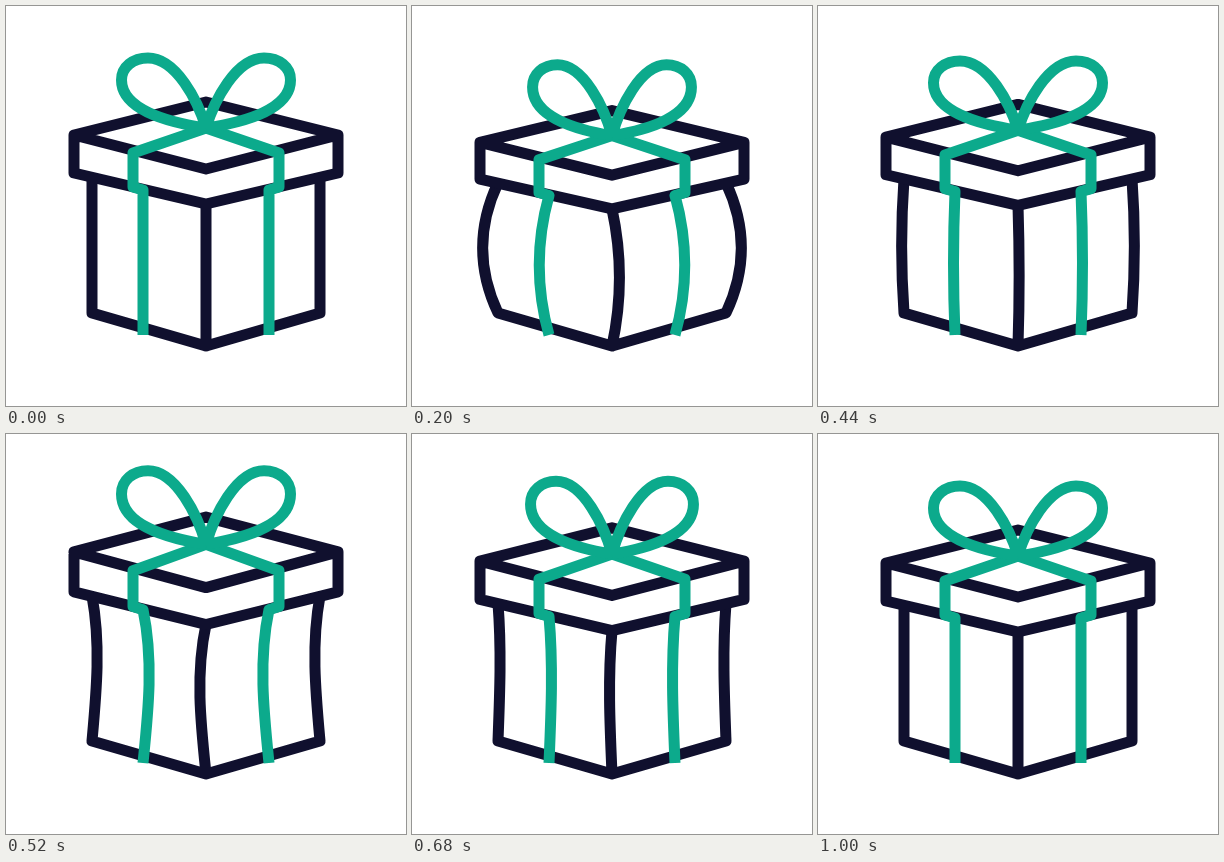
Write an HTML page that moves like this. It is 400x400 px and loops after 1.08 s.

```html
<!DOCTYPE html>
<html lang="en">
<head>
<meta charset="utf-8">
<title>Gift box</title>
<style>
  html, body { margin: 0; width: 100%; height: 100%; overflow: hidden; background: #fff; }
  svg { display: block; width: 100%; height: 100%; }
  path { fill: none; stroke-width: 11; stroke-linejoin: round; }
  .box { stroke: #10102e; stroke-linecap: round; }
  .lid { fill: #fff; }
  .ribbon { stroke: #0caa8c; }
</style>
</head>
<body>
<svg viewBox="0 0 400 400">
  <path id="body" class="box"/>
  <path id="lid" class="box lid"/>
  <path id="ribbon" class="ribbon"/>
  <path id="bow" class="ribbon"/>
</svg>
<script>
const LOOP = 1080, STEP = 40, FLOOR = 340;

// Smooth curve through [time, value] keys that never overshoots a key.
function curve(keys) {
  const slope = i => (keys[i + 1][1] - keys[i][1]) / (keys[i + 1][0] - keys[i][0]);
  const tangents = keys.map((_, i) => {
    if (i === 0 || i === keys.length - 1) return 0;
    const a = slope(i - 1), b = slope(i);
    return a * b > 0 ? 2 * a * b / (a + b) : 0;
  });
  return t => {
    let i = 0;
    while (i < keys.length - 2 && t > keys[i + 1][0]) i++;
    const [t0, v0] = keys[i], [t1, v1] = keys[i + 1];
    const h = t1 - t0, s = Math.min(1, (t - t0) / h), r = 1 - s;
    return v0 * (1 + 2 * s) * r * r + v1 * s * s * (3 - 2 * s)
      + h * s * r * (tangents[i] * r - tangents[i + 1] * s);
  };
}

const squash = curve([[0, 0], [200, .035], [360, .049], [520, -.053], [560, -.076],
  [680, -.009], [760, .01], [840, .008], [1000, 0]]);
const bulge = curve([[0, 0], [200, .93], [360, 1], [520, -1], [560, -1.2],
  [680, -.4], [840, 0], [1000, 0]]);
const perk = curve([[0, 0], [200, 1], [360, 0], [520, 0], [680, .6],
  [760, .75], [840, .6], [1000, 0]]);

const set = (id, d) => document.getElementById(id).setAttribute('d', d);

function draw(time) {
  const t = Math.floor(time % LOOP / STEP) * STEP;
  const k = squash(t), u = bulge(t), p = perk(t);
  const Y = y => y + k * (FLOOR - y);
  const at = (x, y) => `${x} ${Y(y)}`;

  // Upright edge that bends outwards when squashed and inwards when stretched.
  const bend = (x, top, bottom, out, inward) => {
    const c = u * (u > 0 ? out : inward) / .75;
    const lean = u > 0 ? 0 : .35;
    const h = bottom - top;
    return `C${x + c * (1 + lean)} ${top + h / 3} ${x + c * (1 - lean)} ${top + h * 2 / 3} ${x} ${bottom}`;
  };

  const side = s => {
    const x = 200 + s * 114;
    return `M${at(x, 171)}${bend(x, Y(171), 307, s * 16.5, s * 5)}L200 ${FLOOR}`;
  };
  set('body', side(-1) + side(1)
    + `M${at(200, 198)}${bend(200, Y(198), FLOOR, 8, 6)}`);

  set('lid', `M${at(68, 129)}L${at(200, 96)}L${at(332, 129)}L${at(332, 167)}`
    + `L${at(200, 198)}L${at(68, 167)}ZL${at(200, 163)}L${at(332, 129)}`);

  const band = s => {
    const x = 200 + s * 63, edge = 200 + s * 73;
    return `M${at(200, 122)}L${at(edge, 147)}L${at(edge, 181)}L${at(x, 184)}`
      + bend(x, Y(184), 329, s * 10.5, s * 6);
  };
  set('ribbon', band(-1) + band(1));

  // Loop points are measured from the knot.
  const loop = s => {
    const q = (x, y) => at(200 + s * x * (1 - .06 * p), 122 - y * (1 + .05 * p));
    return `M${q(0, 0)}C${q(8, 27)} ${q(30, 70)} ${q(58, 70)}`
      + `C${q(73, 70)} ${q(84.5, 61)} ${q(84.5, 48)}`
      + `C${q(84.5, 19)} ${q(40, 6)} ${q(0, 0)}`;
  };
  set('bow', loop(-1) + loop(1));
}

const start = performance.now();
function tick() {
  draw(performance.now() - start);
  requestAnimationFrame(tick);
}
tick();
</script>
</body>
</html>
```
